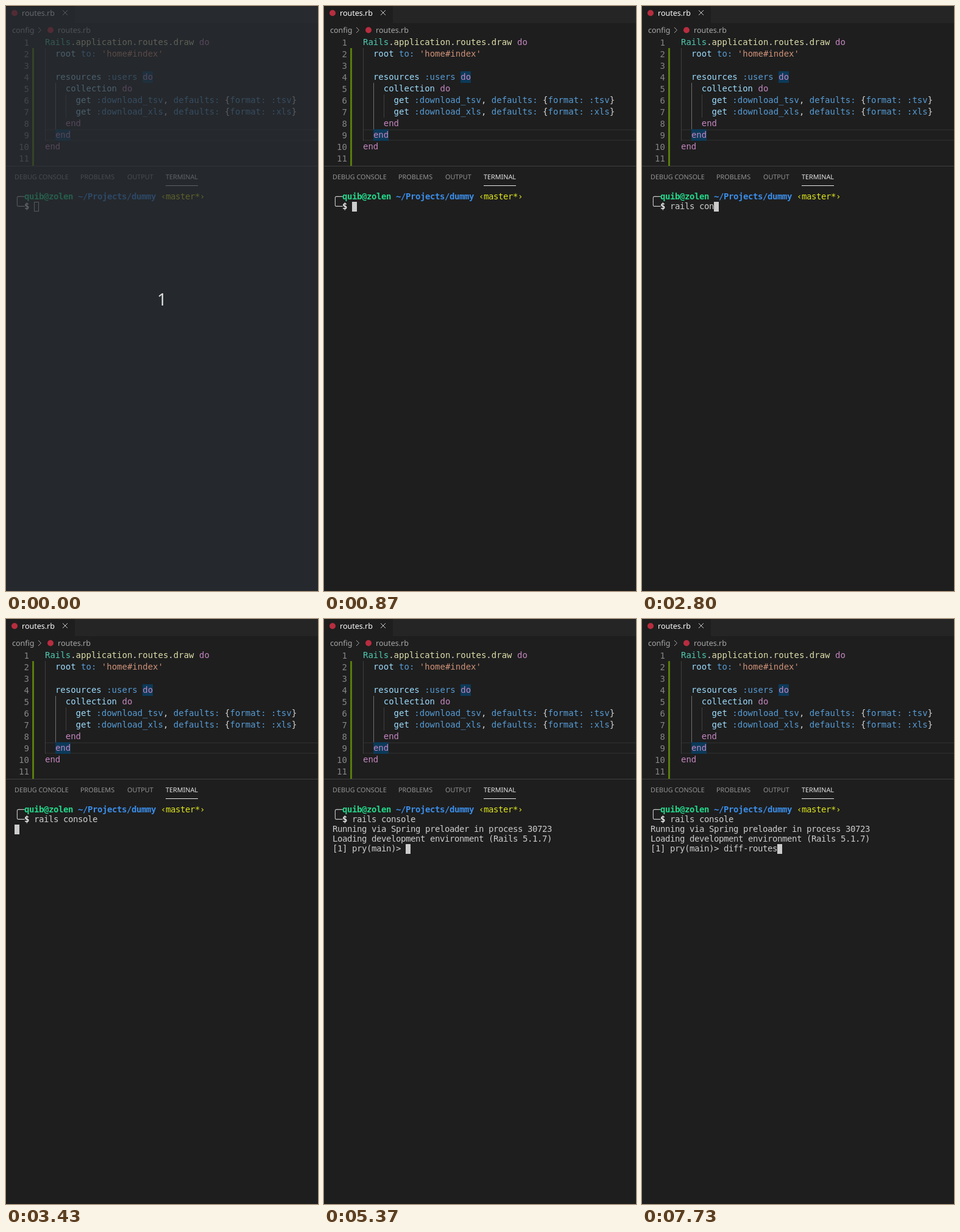
An HTML page that plays this animation: 512x959 px, repeating every 8 s.

```html
<!DOCTYPE html>
<html lang="en">
<head>
<meta charset="utf-8">
<title>Editor and terminal</title>
<style>
  html, body { margin: 0; width: 100%; height: 100%; overflow: hidden; background: #1e1e1e; }
  #stage { position: relative; width: 512px; height: 959px; overflow: hidden; background: #1e1e1e; }
  #stage > * { position: absolute; margin: 0; }
  svg {
    left: 0; top: 0; text-rendering: geometricPrecision;
    font-family: "Noto Sans", "Open Sans", sans-serif;
  }
  pre {
    font: 14px/19px "DejaVu Sans Mono", monospace; white-space: pre;
    letter-spacing: calc(var(--cell) - 1ch); --cell: 8.43px;
  }

  #nums { left: 21px; top: 51px; color: #858585; }
  #code { left: 64px; top: 50px; color: #d4d4d4; }
  .cls { color: #4ec9b0; }
  .fn  { color: #dcdcaa; }
  .key { color: #c586c0; }
  .var { color: #9cdcfe; }
  .sym { color: #569cd6; }
  .str { color: #ce9178; }

  /* Terminal cells are 8 by 16 */
  #term { left: 14px; top: 304px; line-height: 16px; --cell: 8px; color: #ccc; }
  #term b { color: #e5e5e5; }
  #term .user { color: #23d98b; }
  #term .path { color: #3b8eea; }
  .branch { color: #dfe61c; }
  #cursor { width: 8px; height: 16px; box-sizing: border-box; border: 1px solid #ccc; background: #ccc; }
  #cursor.hollow { background: none; }

  #count {
    inset: 1px 0 0; background: rgba(40, 44, 50, .71); color: #d9dad8;
    font: 28px/958px "Noto Sans", "Open Sans", sans-serif; text-align: center;
  }
</style>
</head>
<body>
<div id="stage">
  <svg width="512" height="959" viewBox="0 0 512 959">
    <rect x="113" width="399" height="28" fill="#252526"/>
    <g fill="#b72d3f">
      <circle cx="14" cy="11.5" r="5"/>
      <circle cx="73" cy="39.5" r="5"/>
    </g>
    <g font-size="12.5">
      <text x="26" y="16" fill="#fff">routes.rb</text>
      <g fill="#a9a9a9">
        <text x="10" y="44">config</text>
        <text x="85" y="44">routes.rb</text>
      </g>
    </g>
    <g fill="none" stroke="#ccc">
      <path d="M93 7l8 8m0-8l-8 8"/>
      <path d="M53 35l4.5 4.5L53 44" stroke="#a9a9a9"/>
    </g>

    <rect x="43" y="69" width="3" height="193" fill="#587c0c"/>
    <path d="M64 203H512M64 220H512" stroke="#282828" stroke-width="2"/>
    <g fill="#0c3a59">
      <rect x="224" y="107" width="17" height="19"/>
      <rect x="81" y="202" width="25" height="19"/>
    </g>
    <path d="M64.5 69V221M98.5 145V183" stroke="#404040"/>
    <path d="M81.5 126V202" stroke="#707070"/>

    <path d="M0 262.5H512" stroke="#414141"/>
    <g font-size="10.8" fill="#949494">
      <text x="14" y="284">DEBUG CONSOLE</text>
      <text x="122" y="284">PROBLEMS</text>
      <text x="199" y="284">OUTPUT</text>
      <text x="262" y="284" fill="#e7e7e7">TERMINAL</text>
    </g>
    <path d="M262 294.5H315" stroke="#e7e7e7"/>
  </svg>

  <pre id="nums"> 1
 2
 3
 4
 5
 6
 7
 8
 9
10
11</pre>
  <pre id="code"><span class="cls">Rails</span>.<span class="fn">application</span>.<span class="fn">routes</span>.<span class="fn">draw</span> <span class="key">do</span>
  <span class="var">root</span> <span class="sym">to:</span> <span class="str">'home#index'</span>

  <span class="var">resources</span> <span class="sym">:users</span> <span class="key">do</span>
    <span class="var">collection</span> <span class="key">do</span>
      <span class="var">get</span> <span class="sym">:download_tsv</span>, <span class="sym">defaults:</span> {<span class="sym">format: :tsv</span>}
      <span class="var">get</span> <span class="sym">:download_xls</span>, <span class="sym">defaults:</span> {<span class="sym">format: :xls</span>}
    <span class="key">end</span>
  <span class="key">end</span>
<span class="key">end</span></pre>

  <pre id="term">╭─<b class="user">quib@zolen</b> <b class="path">~/Projects/dummy</b> <span class="branch">‹master*›</span>
╰─<b>$</b> <span id="out"></span></pre>
  <div id="cursor" class="hollow"></div>
  <div id="count">1</div>
</div>

<script>
  const LOOP = 8000, COUNT_END = 30, FOCUS = 870;

  // Time in ms and the text that appears then
  const events = [
    [1670, "r"], [1830, "a"], [1930, "i"], [2100, "l"], [2230, "s"], [2370, " "],
    [2600, "c"], [2630, "o"], [2800, "n"], [2870, "s"], [3200, "o"], [3270, "le"],
    [3430, "\n"],
    [4830, "Running via Spring preloader in process 30723\n"],
    [4900, "Loading development environment (Rails 5.1.7)\n"],
    [5370, "[1] pry(main)> "],
    [6770, "d"], [6970, "i"], [7200, "f"], [7400, "f"], [7730, "-routes"]
  ];

  const [out, cursor, count] = ["out", "cursor", "count"].map(id => document.getElementById(id));
  const start = performance.now();
  let shown = null;

  function draw() {
    const t = (performance.now() - start) % LOOP;
    count.hidden = t >= COUNT_END;
    cursor.classList.toggle("hollow", t < FOCUS);

    const text = events.filter(([at]) => at <= t).map(([, part]) => part).join("");
    if (text !== shown) {
      out.textContent = shown = text;
      const lines = ("\n╰─$ " + text).split("\n");
      const row = lines.length - 1;
      cursor.style.left = 14 + 8 * lines[row].length + "px";
      cursor.style.top = 305 + 16 * row + "px";
    }
    requestAnimationFrame(draw);
  }
  draw();
</script>
</body>
</html>
```
